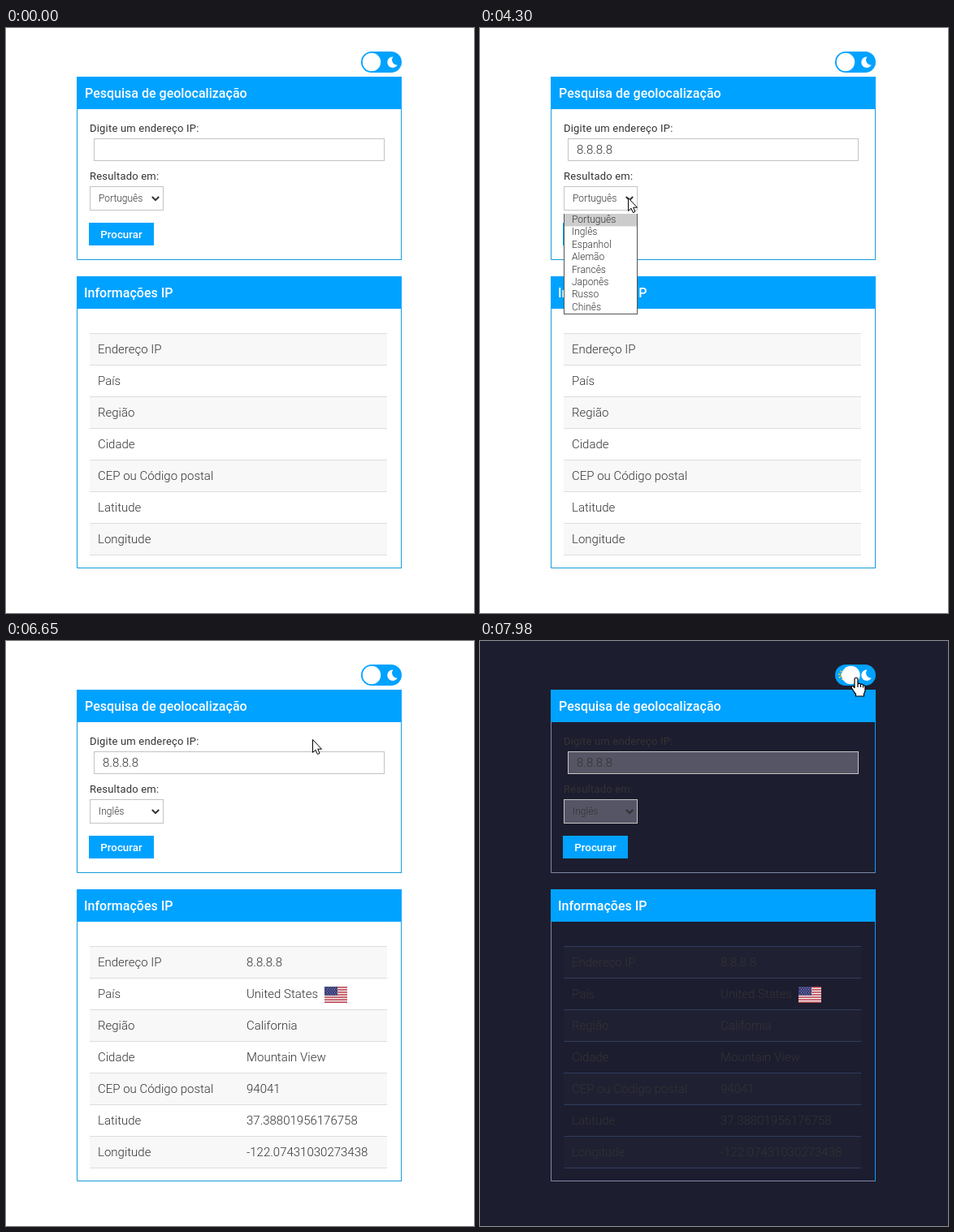
Recreate the animation shown at these times as an HTML page. Size 576 by 721 pixels, loop 8 s.

```html
<!DOCTYPE html>
<html lang="pt">
<head>
<meta charset="utf-8">
<title>Pesquisa de geolocalização</title>
<style>
  html, body { margin: 0; width: 576px; height: 721px; overflow: hidden; }
  svg {
    --page: #fff; --field: #fff; --stripe: #f8f8f8; --line: #ddd; --edge: #149bdc; --side: #149bdc;
    display: block; background: var(--page); font: 300 15px Roboto, sans-serif; fill: #333;
  }
  svg.dark {
    --page: #1d1d30; --field: #565565; --stripe: #202033; --line: #2f3c5e; --edge: #00a2ff; --side: #7f89a6;
  }
  .blue { fill: #00a2ff; }
  .title { font-size: 16px; font-weight: 500; fill: #fff; }
  .label { font-size: 13px; font-weight: 400; letter-spacing: .2px; }
  .small { font-size: 12px; }
  .button { font-size: 13.33px; font-weight: 500; fill: #fff; text-anchor: middle; }
  .field { fill: var(--field); stroke: #c4c4c4; }
  .focus { stroke: #a0a0a0; filter: drop-shadow(0 0 2.5px #9999); }
  .row { stroke: var(--line); }
</style>
</head>
<body>
<svg id="stage" width="576" height="721" viewBox="0 0 576 721">
  <g id="panels"></g>

  <g id="toggle">
    <rect class="blue" x="437" y="29" width="50" height="26" rx="13"/>
    <circle cx="447" cy="42" r="3.2" fill="#f7cf45"/>
    <circle cx="447" cy="42" r="5" fill="none" stroke="#f7cf45" stroke-width="2" stroke-dasharray="1.6 2.33"/>
    <path fill="#fff" d="M476.5 35.4A6.8 6.8 0 1 0 482 45.6A6.3 6.3 0 0 1 476.5 35.4Z"/>
    <circle id="knob" cx="450" cy="42" r="11.2" fill="#fff"/>
  </g>

  <text class="label" x="103" y="128">Digite um endereço IP:</text>
  <rect id="input" class="field" x="108.5" y="136.5" width="357" height="27"/>
  <text id="typed" x="119" y="155"></text>
  <path id="caret" stroke="#222"/>

  <text class="label" x="103" y="187">Resultado em:</text>
  <rect class="field" x="103.5" y="195.5" width="90" height="29"/>
  <text id="choice" class="small" x="114" y="214"></text>
  <path d="M179.8 208l4.2 4.2l4.2-4.2" fill="none" stroke="#333" stroke-width="2"/>

  <rect id="button" class="blue" x="102" y="240" width="80" height="28"/>
  <text class="button" x="142" y="259">Procurar</text>

  <g id="table"></g>
  <g id="results"></g>
  <g id="list"></g>

  <g id="cursor" stroke="#000" fill="#fff">
    <path id="arrow" d="M.5 .5V16.5L4 13.2L6.4 18.6L9 17.4L6.7 12.2H11.5Z"/>
    <path id="beam" fill="none" stroke-width="1.4" d="M-3.5-7.5H-1Q0-7.5 0-6.5Q0-7.5 1-7.5H3.5M0-7V7M-3.5 7.5H-1Q0 7.5 0 6.5Q0 7.5 1 7.5H3.5"/>
    <path id="hand" stroke-width="1.2" d="M-2 1.5Q0-1 2 1.5V8Q4 6.5 5.5 8.5Q7.5 7.5 8.5 9.5Q11 9 11 12V16Q11 18 9.5 20V23H-.5V20.5Q-3 18-4.5 14.5Q-7 11.5-5 10.5Q-3.5 10-2 13ZM2 8V12M5.5 9V12M8.5 10V12.5"/>
  </g>
</svg>
<script>
const $ = id => document.getElementById(id);
const show = (id, on) => $(id).style.display = on ? '' : 'none';
const rect = (x, y, w, h, attrs) => `<rect x="${x}" y="${y}" width="${w}" height="${h}" ${attrs}/>`;
const text = (x, y, s, cls = '') => `<text x="${x}" y="${y}" class="${cls}">${s}</text>`;

const LOOP = 8000, ROW = 39, OPTION = 15.4;
const languages = ['Português', 'Inglês', 'Espanhol', 'Alemão', 'Francês', 'Japonês', 'Russo', 'Chinês'];
const info = [
  ['Endereço IP', '8.8.8.8'], ['País', 'United States'], ['Região', 'California'],
  ['Cidade', 'Mountain View'], ['CEP ou Código postal', '94041'],
  ['Latitude', '37.38801956176758'], ['Longitude', '-122.07431030273438']
];
const keyTimes = [1300, 1570, 1860, 2140, 2390, 2700, 3170];

function panel(y, h, x, title) {
  return `<path d="M87.5 ${y}V${y + h - .5}H487" fill="none" stroke="var(--side)"/>` +
    `<path d="M486.5 ${y}V${y + h}" stroke="var(--edge)"/>` +
    rect(87, y, 400, 40, 'class="blue"') + text(x, y + 25.5, title, 'title');
}

function flag(x, y) {
  const stripe = 20 / 13;
  let out = rect(x, y, 28, 20, 'fill="#f4eeee"');
  for (let i = 0; i < 13; i += 2) out += rect(x, y + i * stripe, 28, stripe, 'fill="#bb4450"');
  out += rect(x, y, 16, 7 * stripe, 'fill="#3a3c78"');
  for (let i = 0; i < 5; i++)
    out += `<path d="M${x + 1.5 + i % 2 * 1.5} ${y + 1.5 + i * 2}h13" stroke="#c4c5dc" stroke-width=".8" stroke-dasharray=".8 2.2"/>`;
  return out;
}

$('panels').innerHTML = panel(60, 226, 97, 'Pesquisa de geolocalização') + panel(306, 360, 96, 'Informações IP');
$('table').innerHTML = info.map(([name], i) => {
  const y = 376 + i * ROW;
  return (i % 2 ? '' : rect(103, y, 366, ROW, 'fill="var(--stripe)"')) + text(113, y + 25, name);
}).join('') + Array.from({ length: 8 }, (_, i) =>
  `<path class="row" d="M103 ${376.5 + i * ROW}H469"/>`).join('');
$('results').innerHTML = info.map(([, value], i) => text(296, 401 + i * ROW, value)).join('') + flag(392, 426);
$('list').innerHTML = rect(103.5, 229.5, 90, 123, 'fill="#fff" stroke="#555"') +
  rect(104, 0, 89, OPTION, 'id="mark" fill="#ccc"') +
  languages.map((name, i) => text(113, 240 + i * OPTION, name, 'small')).join('');

// Pointer legs: start, end, from, to and an optional control point
const legs = [
  [280, 740, [23, 152], [215, 154]],
  [3420, 4080, [215, 154], [182, 209]],
  [4320, 4760, [182, 209], [163, 250]],
  [4890, 4930, [163, 250], [165.5, 249]],
  [6110, 6890, [174, 245], [424, 73], [300, 210]],
  [6900, 7290, [424, 73], [463, 45]]
];
const ease = p => p < .5 ? 2 * p * p : 1 - 2 * (1 - p) ** 2;

function pointer(t) {
  const [start, end, a, b, c] = legs.filter(leg => t >= leg[0]).pop() || legs[0];
  const p = ease(Math.min(1, Math.max(0, (t - start) / (end - start))));
  return a.map((v, i) => {
    const mid = c ? c[i] : (v + b[i]) / 2;
    return (1 - p) ** 2 * v + 2 * p * (1 - p) * mid + p * p * b[i];
  });
}

const inside = (x, y, l, t, r, b) => x >= l && x <= r && y >= t && y <= b;

function draw(t) {
  const [x, y] = pointer(t);
  const open = t >= 4300 && t < 5240;
  const overButton = !open && inside(x, y, 102, 240, 182, 268);
  const shape = inside(x, y, 108, 136, 466, 164) ? 'beam'
    : overButton || inside(x, y, 437, 29, 487, 55) ? 'hand' : 'arrow';
  show('cursor', t >= 280);
  for (const id of ['arrow', 'beam', 'hand']) show(id, id === shape);
  $('cursor').setAttribute('transform', `translate(${Math.round(x)} ${Math.round(y)})`);

  const focused = t >= 800 && t < 4300;
  $('input').classList.toggle('focus', focused);
  $('typed').textContent = '8.8.8.8'.slice(0, keyTimes.filter(k => t >= k).length);
  show('caret', focused && t < 3670);
  const caretX = Math.floor(119 + $('typed').getComputedTextLength()) + .5;
  $('caret').setAttribute('d', `M${caretX} 141V159`);

  $('choice').textContent = languages[t < 5240 ? 0 : 1];
  show('list', open);
  const option = Math.max(0, Math.floor((y - 229) / OPTION));
  $('mark').setAttribute('y', 229 + option * OPTION);

  $('button').style.fill = overButton && t >= 5440 ? '#0085d1' : '';
  show('results', t >= 5710);

  $('stage').classList.toggle('dark', t >= 7930);
  $('knob').setAttribute('cx', t < 7930 ? 450 : 452 + Math.min(4.5, (t - 7930) * .09));
}

const begin = performance.now();
function tick() {
  draw((performance.now() - begin) % LOOP);
  requestAnimationFrame(tick);
}
tick();
</script>
</body>
</html>
```
